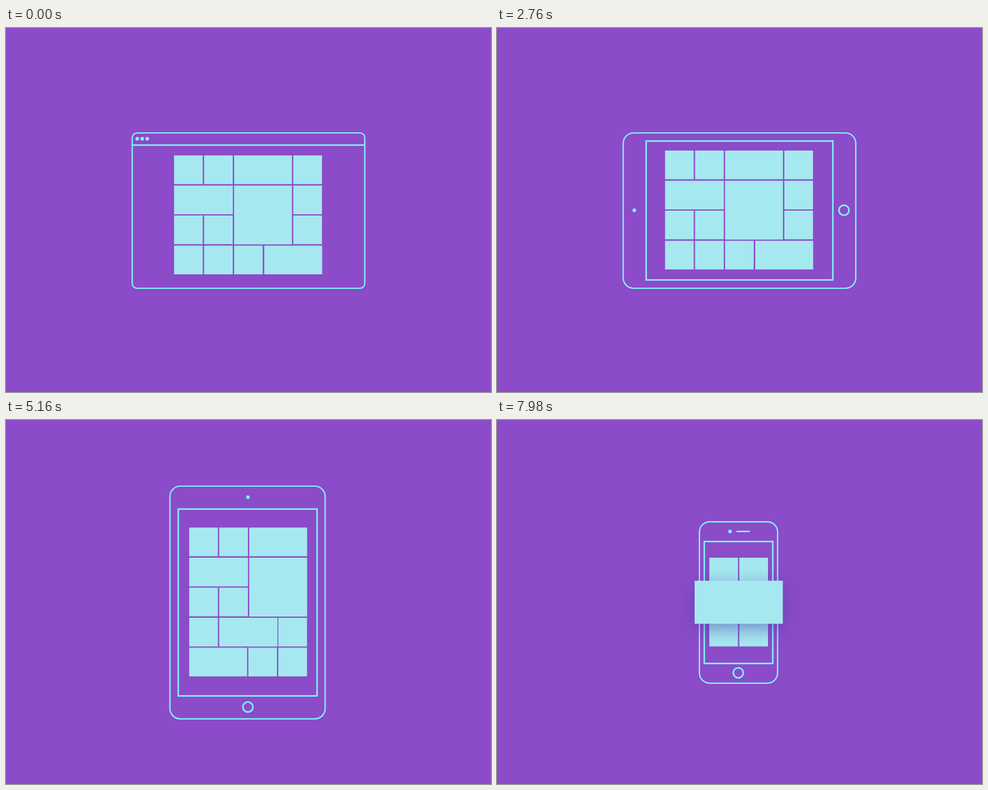
An HTML page with a canvas that plays this animation: 800x600 px, repeating every 8000 ms.

```html
<!DOCTYPE html>
<html lang="en">
<head>
<meta charset="utf-8">
<title>Responsive layout</title>
<style>
  html, body { margin: 0; width: 100%; height: 100%; overflow: hidden; background: #8c4bc8; }
  canvas { display: block; width: 800px; height: 600px; }
</style>
</head>
<body>
<canvas id="stage" width="800" height="600"></canvas>
<script>
const LOOP = 8000;
const BACKGROUND = '#8c4bc8';
const LINE = '#7ef3fa';
const BLOCK = '#a6e8f0';
const CELL = 47.3;
const ctx = document.getElementById('stage').getContext('2d');

const lerp = (a, b, p) => a + (b - a) * p;
const ease = u => u < 0.5 ? 4 * u ** 3 : 1 - 4 * (1 - u) ** 3;

// Eased value at time t through [time, value] keys.
function track(t, ...keys) {
  if (t <= keys[0][0]) return keys[0][1];
  for (let i = 1; i < keys.length; i++) {
    const [t0, v0] = keys[i - 1], [t1, v1] = keys[i];
    if (t < t1) return lerp(v0, v1, ease((t - t0) / (t1 - t0)));
  }
  return keys[keys.length - 1][1];
}
const ramp = (t, start, end) => track(t, [start, 0], [end, 1]);

// Blocks relative to the grid corner; "to" is the place in the portrait grid.
const box = (x, y, w = CELL, h = CELL, extra = {}) => ({ x, y, w, h, ...extra });
const blocks = [
  box(0, 0, CELL, CELL, { keep: true }),
  box(49.5, 0, CELL, CELL, { keep: true }),
  box(0, 99, CELL, CELL, { keep: true }),
  box(49.5, 99, CELL, CELL, { keep: true }),
  box(99, 0, 95.5),
  box(0, 148.7),
  box(99, 148.7, CELL, CELL, { to: box(98, 148.7) }),
  box(49.5, 148.7, CELL, CELL, { to: box(49.5, 148.7, 96) }),
  box(196.7, 0, CELL, CELL, { to: box(147, 148.7) }),
  box(196.7, 49.7, CELL, CELL, { to: box(147, 198) }),
  box(196.7, 99, CELL, CELL, { to: box(97.5, 198) }),
  box(148.8, 148.7, 95.5, CELL, { to: box(0, 198, 95.5) }),
  box(99, 49.7, 95.5, 97, { role: 'big' }),
  box(0, 49.7, 97, CELL, { role: 'wide', keep: true })
];
const tucked = box(25, 49.7);

function mix(a, b, p) {
  return box(lerp(a.x, b.x, p), lerp(a.y, b.y, p), lerp(a.w, b.w, p), lerp(a.h, b.h, p));
}

function gridCorner(t, turn) {
  const lift = ramp(t, 1740, 2160), shrink = ramp(t, 5390, 5930);
  return {
    x: 277.2 + 25 * turn + 48 * shrink,
    y: 210 - 8 * lift - 24.7 * turn + 49.7 * shrink
  };
}

function blockScale(t, role) {
  if (role === 'big') return track(t, [3240, 1], [3500, 1.5], [3718, 1.5], [4258, 1]);
  if (role === 'wide') {
    return track(t, [5200, 1], [5420, 1.5], [5800, 1.5], [6250, 1], [7480, 1], [7940, 1.5]);
  }
  return 1;
}

function drawBlocks(t) {
  const turn = ramp(t, 3480, 4220);
  const shuffle = ramp(t, 3553, 4293);
  const bigTurn = ramp(t, 3641, 4381);
  const tuck = ramp(t, 5370, 5900);
  blocks
    .filter(b => b.keep || tuck < 1)
    .map(b => ({ b, scale: blockScale(t, b.role) }))
    .sort((p, q) => p.scale - q.scale)
    .forEach(({ b, scale }) => {
      const corner = gridCorner(t, b.role === 'big' ? bigTurn : turn);
      let r = b.to ? mix(b, b.to, shuffle) : b;
      if (!b.keep) r = mix(r, tucked, tuck);
      const w = r.w * scale, h = r.h * scale;
      const raised = Math.min(1, (scale - 1) * 3);
      ctx.save();
      ctx.fillStyle = BLOCK;
      if (raised > 0) {
        ctx.shadowColor = `rgba(70, 60, 165, ${0.55 * raised})`;
        ctx.shadowBlur = 28 * raised;
        ctx.shadowOffsetY = 8 * raised;
      }
      ctx.fillRect(corner.x + r.x + (r.w - w) / 2, corner.y + r.y + (r.h - h) / 2, w, h);
      ctx.restore();
    });
}

function dot(x, y, r) {
  if (r <= 0) return;
  ctx.beginPath();
  ctx.arc(x, y, r, 0, 7);
  ctx.fill();
}

function polyline(points) {
  ctx.beginPath();
  points.forEach(([x, y]) => ctx.lineTo(x, y));
  ctx.stroke();
}

// The title bar line becomes the top of the screen, then its sides grow down.
function drawScreen(t, phone) {
  const left = -lerp(track(t, [1380, 191.5], [1760, 154]), 100.5, phone);
  const right = lerp(track(t, [1430, 191.5], [1870, 154]), 100.5, phone);
  const top = lerp(track(t, [1380, -108], [1830, -114.7]), -56.5, phone);
  const bottom = lerp(114.3, 56.5, phone);
  const grow = ramp(t, 1720, 2250);
  ctx.lineWidth = 2.5;
  if (grow === 1) {
    ctx.strokeRect(left, top, right - left, bottom - top);
    return;
  }
  polyline([[left, top], [right, top]]);
  if (grow === 0) return;
  const down = lerp(top, bottom, Math.min(1, grow * 2));
  const inward = Math.max(0, grow * 2 - 1) * (right - left) / 2;
  polyline([[left, top], [left, down], [left + inward, down]]);
  polyline([[right, top], [right, down], [right - inward, down]]);
}

// Drawn in landscape; the turn brings the home button to the bottom.
function drawDevice(t) {
  const angle = track(t, [3300, 0], [3930, 92.4], [4290, 90]);
  const phone = ramp(t, 5300, 5863);
  const pulse = track(t, [900, 1], [1200, 1.088], [1560, 1]);
  const upright = Math.min(1, angle / 90);
  const w = lerp(383.6, 266, phone), h = lerp(256, 129, phone);

  ctx.save();
  ctx.translate(400 - 1.6 * upright, 301 - 0.2 * upright);
  ctx.rotate(angle * Math.PI / 180);
  ctx.scale(pulse, pulse);
  ctx.strokeStyle = ctx.fillStyle = LINE;
  ctx.lineWidth = 2.2;
  ctx.beginPath();
  ctx.roundRect(-w / 2, -h / 2, w, h, track(t, [1000, 8], [1450, 17]));
  ctx.stroke();

  drawScreen(t, phone);

  const dots = 3 * (1 - ramp(t, 1000, 1300));
  for (const x of [-183.5, -175.3, -167]) dot(x, -118.5, dots);

  const parts = ramp(t, 1850, 2250);
  dot(lerp(-173.5, -117, phone), lerp(-0.6, 14, phone), 3 * parts);
  if (parts > 0) {
    ctx.lineWidth = 2.6;
    ctx.beginPath();
    ctx.arc(lerp(172.3, 116, phone), lerp(-0.6, 0.4, phone), 8.3 * parts, 0, 7);
    ctx.stroke();
  }

  const speaker = 10 * ramp(t, 5650, 6000);
  if (speaker > 0) {
    ctx.lineCap = 'round';
    ctx.lineWidth = 2.5;
    polyline([[-117, -7.5 - speaker], [-117, -7.5 + speaker]]);
  }
  ctx.restore();
}

function frame(now) {
  const t = now % LOOP;
  ctx.fillStyle = BACKGROUND;
  ctx.fillRect(0, 0, 800, 600);
  drawDevice(t);
  drawBlocks(t);
}

const start = performance.now();
function tick() {
  frame(performance.now() - start);
  requestAnimationFrame(tick);
}
tick();
</script>
</body>
</html>
```
